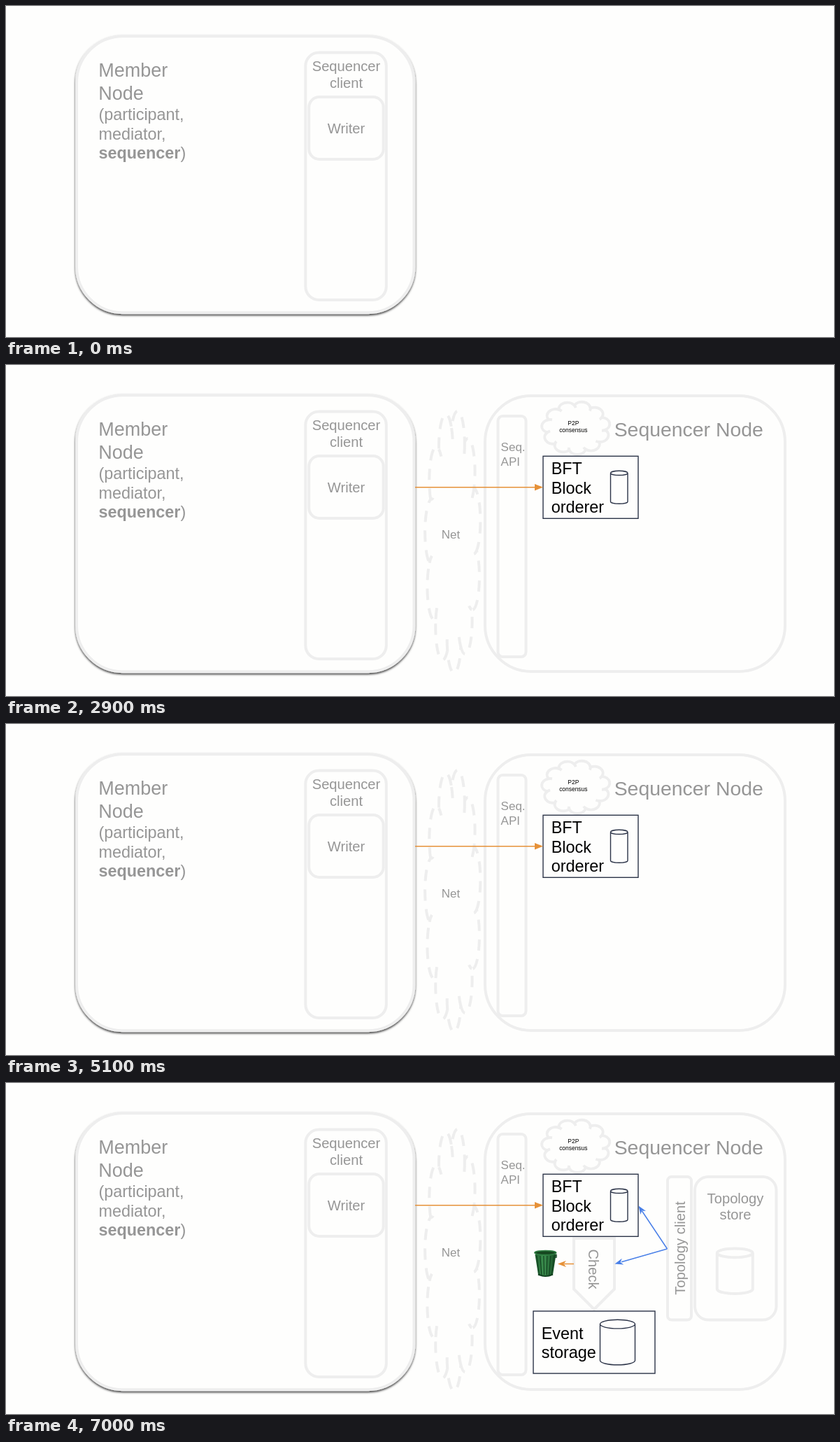
Recreate the animation shown at these times as an HTML page. Size 1184x473 px, loop 8 s.

```html
<!DOCTYPE html>
<html lang="en">
<head>
<meta charset="utf-8">
<title>Sequencer architecture</title>
<style>
  html, body { margin: 0; width: 100%; height: 100%; overflow: hidden; background: #fefefd; }
  svg { display: block; width: 1184px; height: 473px; font-family: "Liberation Sans", Arial, sans-serif; }
  text { fill: #969696; font-size: 20.2px; }
  .mid { text-anchor: middle; }
  .title { font-size: 28.4px; }
  .name { font-size: 27px; }
  .big { font-size: 23.4px; }
  .small { font-size: 17px; }
  .tiny { font-size: 8.45px; }
  .ink { fill: #000; }
  .soft { fill: none; stroke: #eee; stroke-width: 4; }
  .box { fill: #fefefd; stroke: #2c3448; stroke-width: 1.4; }
  .dash { stroke-dasharray: 16 12; }
  .orange { fill: #e69138; stroke: #e69138; stroke-width: 1.5; }
  .blue { fill: #4a80e8; stroke: #4a80e8; stroke-width: 1.5; }
  .head { stroke: none; }
  #server { animation: server 8s step-end infinite; }
  #checks { animation: checks 8s step-end infinite; }
  @keyframes server { 0% { visibility: hidden; } 6.25%, 100% { visibility: visible; } }
  @keyframes checks { 0% { visibility: hidden; } 68.75%, 100% { visibility: visible; } }
</style>
</head>
<body>
<svg viewBox="0 0 1184 473">
  <defs>
    <filter id="shadow" x="-5%" y="-5%" width="110%" height="110%">
      <feDropShadow dx="0" dy="2" stdDeviation="1.8" flood-color="#000" flood-opacity=".75"/>
    </filter>
    <linearGradient id="metal">
      <stop offset="0" stop-color="#1c5a2c"/>
      <stop offset=".4" stop-color="#3d9150"/>
      <stop offset="1" stop-color="#164d24"/>
    </linearGradient>
    <path id="stealth" d="M0 0L-12 -4.6L-8.5 0L-12 4.6Z"/>
  </defs>

  <g id="member">
    <rect class="soft" style="fill:#fefefd" x="101" y="43.2" width="482.5" height="395" rx="66" filter="url(#shadow)"/>
    <text class="name" x="132.2" y="101">Member</text>
    <text class="name" x="132.2" y="134">Node</text>
    <text class="big" x="132.4" y="163">(participant,</text>
    <text class="big" x="132.4" y="190.5">mediator,</text>
    <text class="big" x="132.4" y="218"><tspan font-weight="bold">sequencer</tspan>)</text>
    <rect class="soft" x="428.3" y="66.5" width="115.5" height="353.5" rx="19.3"/>
    <rect class="soft" x="433.2" y="130" width="106.5" height="89" rx="14.8"/>
    <text class="mid" x="486.5" y="93">Sequencer</text>
    <text class="mid" x="486.5" y="117">client</text>
    <text class="mid" x="486.5" y="182">Writer</text>
  </g>

  <g id="server">
    <rect class="soft" x="685" y="44" width="429" height="394" rx="66"/>
    <path class="soft dash" data-cloud="599 62 80 378"/>
    <text class="small mid" x="636" y="248">Net</text>
    <rect class="soft" x="703.5" y="73" width="40" height="344" rx="6.7"/>
    <text class="small" x="707.6" y="123">Seq.</text>
    <text class="small" x="707.6" y="143.5">API</text>
    <path class="soft" data-cloud="766 52 98 76"/>
    <text class="tiny ink mid" x="811.3" y="86.4">P2P</text>
    <text class="tiny ink mid" x="811.3" y="96.3">consensus</text>
    <text class="title" x="869.7" y="102">Sequencer Node</text>
    <rect class="box" x="768" y="130.3" width="136" height="89"/>
    <text class="big ink" x="779.7" y="156">BFT</text>
    <text class="big ink" x="779.7" y="183.7">Block</text>
    <text class="big ink" x="779.7" y="211">orderer</text>
    <path class="box" data-can="864.5 151.3 24.5 47 3.1"/>
    <path class="orange" d="M585 174.7H757"/>
    <path class="orange head" d="M768 174.7L756 170V179.4Z"/>
  </g>

  <g id="checks">
    <path class="soft" d="M812 222H870V294.5L841 323.5L812 294.5Z"/>
    <text class="mid" transform="translate(833.3 266) rotate(90)">Check</text>
    <rect class="box" x="754" y="326" width="174" height="89"/>
    <text class="big ink" x="765.7" y="366">Event</text>
    <text class="big ink" x="765.7" y="393">storage</text>
    <path class="box" data-can="849.5 338.3 50 64.5 6.3"/>
    <rect class="soft" x="946" y="134" width="34" height="204.5" rx="5.7"/>
    <text class="mid" transform="translate(970.5 236) rotate(-90)">Topology client</text>
    <rect class="soft" x="985" y="134" width="116.5" height="204.5" rx="19.4"/>
    <text class="mid" x="1043" y="171.5">Topology</text>
    <text class="mid" x="1043" y="195">store</text>
    <path class="soft" data-can="1016.8 236.5 51 64.5 6.4"/>
    <path class="orange" d="M812 258.5H798"/>
    <use class="orange head" href="#stealth" transform="translate(789 258.5) rotate(180)"/>
    <path class="blue" d="M945.5 237L880 255.8M945.5 237L909.5 183"/>
    <use class="blue head" href="#stealth" transform="translate(870.5 258.5) rotate(164)"/>
    <use class="blue head" href="#stealth" transform="translate(904.5 175.5) rotate(-123.7)"/>
    <g id="bin" fill="none" stroke="#124220">
      <path d="M756.5 245L761 274Q771 279 782 274L786.5 245Z" fill="url(#metal)" stroke="none"/>
      <path data-ribs="771.3 247 274 25 18 6" stroke-width="1.2"/>
      <path d="M761 273.5Q771 278.5 782 273.5" stroke-width="2"/>
      <path d="M784 245.5H787V249H784.5" stroke-width="1.4"/>
      <ellipse cx="771.3" cy="242.6" rx="15.4" ry="3" fill="#15461f" stroke="#2f7d42" stroke-width="1.6"/>
    </g>
  </g>
</svg>
<script>
  // Even round bumps on an ellipse; each arc runs on a little into the cloud.
  function cloud(left, top, width, height) {
    const bumps = 11, step = 2 * Math.PI / bumps, reach = .75, size = .25;
    // Neighbouring bumps meet where their circles cross.
    const half = step / 2 + Math.acos(reach * Math.sin(step / 2) / size) ;
    const open = Math.PI / 2 + step / 2 - (half - step / 2);
    const point = (turn, angle) => {
      const x = reach * Math.cos(turn) + size * Math.cos(turn + angle);
      const y = reach * Math.sin(turn) + size * Math.sin(turn + angle);
      return `${left + width * (1 + x) / 2} ${top + height * (1 + y) / 2}`;
    };
    const arc = end => `A${size * width / 2} ${size * height / 2} 0 0 1 ${end}`;
    let edge = "", curls = "";
    for (let i = 0; i < bumps; i++) {
      const turn = 3.8 + i * step;
      if (!i) edge = "M" + point(turn, -open);
      edge += arc(point(turn, 0)) + arc(point(turn, open));
      curls += "M" + point(turn, open) + arc(point(turn, open + .4));
    }
    return edge + "Z" + curls;
  }

  function can(x, y, w, h, ry) {
    const rx = w / 2, top = y + ry, low = y + h - ry;
    return `M${x} ${top}A${rx} ${ry} 0 0 1 ${x + w} ${top}A${rx} ${ry} 0 0 1 ${x} ${top}` +
      `V${low}A${rx} ${ry} 0 0 0 ${x + w} ${low}V${top}`;
  }

  function ribs(x, top, low, wide, narrow, count) {
    let d = "";
    for (let i = 0; i < count; i++) {
      const k = i / (count - 1) - .5;
      d += `M${x + k * wide} ${top}L${x + k * narrow} ${low}`;
    }
    return d;
  }

  for (const [name, shape] of Object.entries({ cloud, can, ribs }))
    for (const path of document.querySelectorAll(`[data-${name}]`))
      path.setAttribute("d", shape(...path.dataset[name].split(" ").map(Number)));
</script>
</body>
</html>
```
